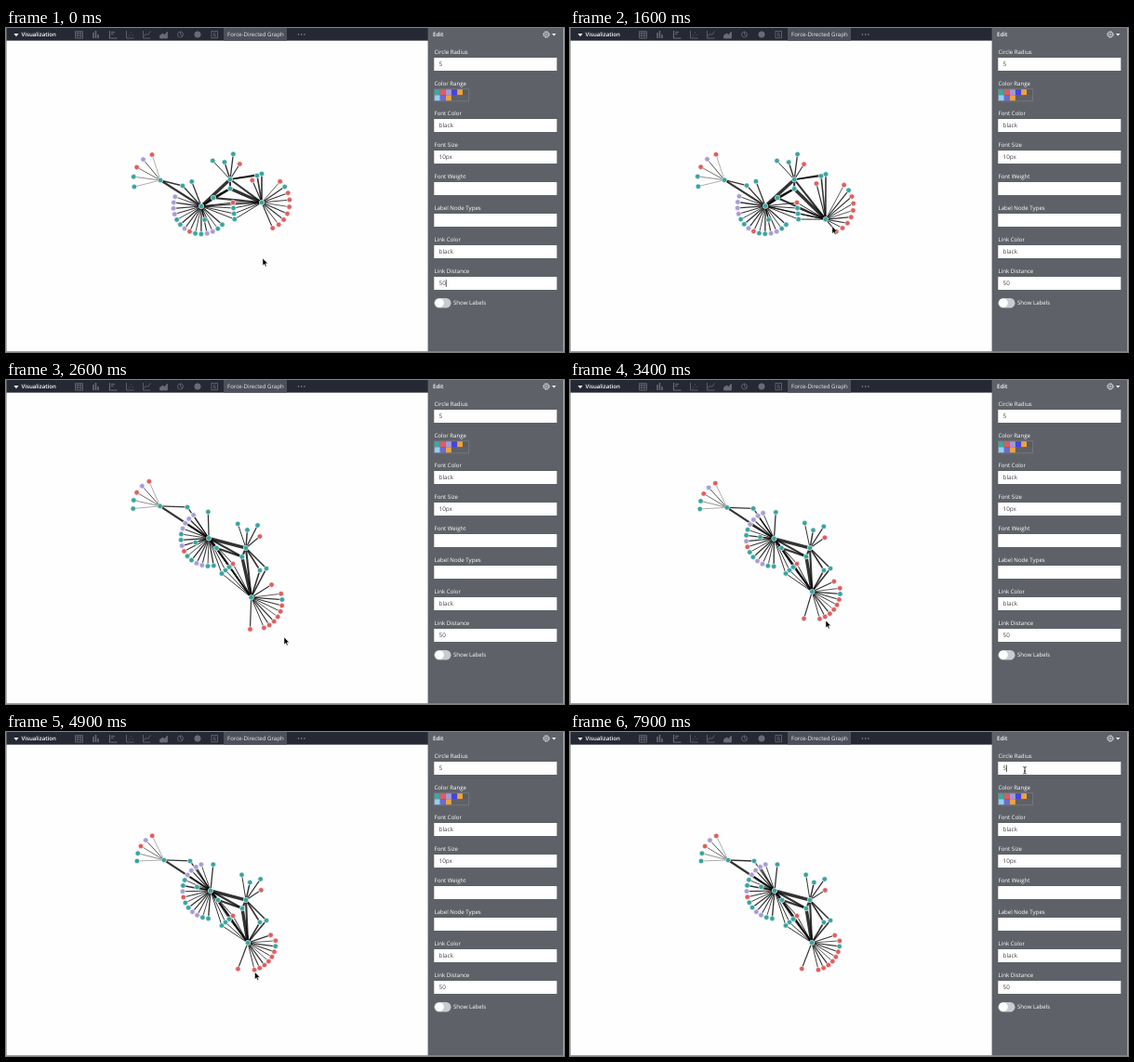
Recreate the animation shown at these times as an HTML page. Size 600x349 px, loop 8000 ms.

```html
<!DOCTYPE html>
<html lang="en">
<head>
<meta charset="utf-8">
<title>Force-Directed Graph</title>
<style>
html, body { margin: 0; width: 100%; height: 100%; overflow: hidden; background: #fff; }
svg { display: block; width: 600px; height: 349px; font: 6.1px "Open Sans", sans-serif; text-rendering: geometricPrecision; }
.bold { font-weight: 600; }
.icons { fill: none; stroke: #666c78; stroke-width: .8; }
</style>
</head>
<body>
<svg id="stage" viewBox="0 0 600 349">
  <rect width="600" height="349" fill="#fefefe"/>
  <g id="links" stroke="#000" stroke-opacity=".8"></g>
  <g id="nodes" stroke="#fff" stroke-width=".6"></g>

  <rect width="454" height="13.6" fill="#242934"/>
  <rect x="234" width="68" height="13.6" fill="#4b505a"/>
  <path d="M8.5 6h5l-2.5 3.2z" fill="#fff"/>
  <text class="bold" x="16.5" y="9.3" fill="#fff">Visualization</text>
  <text x="238" y="9.3" fill="#eceef0">Force-Directed Graph</text>
  <g class="icons">
    <path d="M74.5 3.5h8v7.5h-8zM74.5 5.5h8M74.5 8h8M77 3.5v7.5M80 3.5v7.5"/>
    <path d="M94 11V5M96.5 11V3M99 11V7" stroke-width="1.5"/>
    <path d="M111.5 3v8h8M113 4.5h4M113 6.5h2.5" stroke-width="1.2"/>
    <path d="M129.5 3v8h8M132 8h1M134 5h1M135.5 7.5h1"/>
    <path d="M147.5 3v8h8M148.5 9l2-3 2 1.5 3-4"/>
    <path d="M165.5 11V8l3-2 2 1.5 3-3.5v7z" fill="#666c78"/>
    <circle cx="187.5" cy="7" r="3"/><path d="M187.5 7V4M187.5 7l2.5 1.5"/>
    <circle cx="206" cy="7" r="3.2" fill="#666c78"/>
    <rect x="221" y="3.3" width="6.5" height="7.5"/>
    <path d="M225.5 5h-2v4h2v-2h-2" stroke-width=".6"/>
  </g>
  <path d="M314.5 7h9" stroke="#8d929b" stroke-width="1.6" stroke-linecap="round" stroke-dasharray="0 3.2"/>

  <rect x="453.6" width="146" height="349" fill="#5e6268"/>
  <path d="M.3 0V348.5H600" fill="none" stroke="#85888d" stroke-width=".8"/>
  <text class="bold" x="459" y="9.3" fill="#fff">Edit</text>
  <g fill="none" stroke="#e6e7e8">
    <circle cx="581" cy="7" r="3.2" stroke-dasharray="1.5 1"/>
    <circle cx="581" cy="7" r="2.7" stroke-width=".6"/>
    <circle cx="581" cy="7" r="1.1" stroke-width=".7"/>
  </g>
  <path d="M587 6h4.4l-2.2 2.6z" fill="#fff"/>
  <text x="460.5" y="62" fill="#fff">Color Range</text>
  <g id="swatches"></g>
  <rect x="460.5" y="65.8" width="37" height="13" fill="none" stroke="#a4a7ab" stroke-width=".6" stroke-dasharray="1 1"/>
  <g id="fields"></g>
  <rect x="460.5" y="291" width="18" height="10.5" rx="5.2" fill="#c9cbce"/>
  <circle cx="466" cy="296.2" r="4.8" fill="#fff"/>
  <text x="481" y="298.4" fill="#fff">Show Labels</text>

  <path id="caret" stroke="#222" stroke-width=".7"/>
  <g id="tooltip">
    <rect x="267" y="267.3" width="161" height="17.4" fill="#f1f1f1" stroke="#c9c9c9" stroke-width=".6"/>
    <g fill="#333" font-size="5.6">
      <text x="270.5" y="274.2">Harrowend Tillock Plaza - Quillabenford Ave at Ostmoran</text>
      <text x="270.5" y="281.8">Ave</text>
    </g>
  </g>
  <g id="cursor">
    <path id="arrow" d="M0 0V8L1.8 6.3 3 9 4.2 8.4 3.1 5.7H5.5Z" stroke="#fff" stroke-width=".5"/>
    <path id="beam" d="M-1.7-3.5Q0-3.5 0-2.3 0-3.5 1.7-3.5M0-2.3V2.8M-1.7 4Q0 4 0 2.8 0 4 1.7 4M-1 1H1" fill="none" stroke="#111" stroke-width=".8"/>
  </g>
</svg>
<script>
const $ = id => document.getElementById(id);
const set = (el, attrs) => { for (const key in attrs) el.setAttribute(key, attrs[key]); };
const add = (parent, tag, attrs, text = "") => {
  const el = document.createElementNS("http://www.w3.org/2000/svg", tag);
  set(el, attrs);
  el.textContent = text;
  parent.append(el);
  return el;
};
const smooth = x => { x = Math.min(1, Math.max(0, x)); return x * x * (3 - 2 * x); };
const mix = (a, b, k) => a + (b - a) * k;
const mixAll = (a, b, k) => a.map((v, i) => mix(v, b[i], k));

// Settings panel
const addField = (label, value, y) => {
  add($("fields"), "text", { x: 460.5, y: y - 3.8, fill: "#fff" }, label);
  add($("fields"), "rect", { x: 460.3, y, width: 132, height: 14, fill: "#fff" });
  add($("fields"), "text", { x: 465.5, y: y + 9.4, fill: "#444", "font-size": 6.4 }, value);
};
addField("Circle Radius", "5", 32);
[["Font Color", "black"], ["Font Size", "10px"], ["Font Weight", ""], ["Label Node Types", ""],
  ["Link Color", "black"], ["Link Distance", "50"]].forEach(([label, value], i) => addField(label, value, 98 + 34 * i));
["#3aa9a2", "#e25b5d", "#a697d8", "#4345dc", "#f0a13a", "#585c63", "#8fd0ef", "#6c6ad8", "#f0a13a"].forEach((fill, i) =>
  add($("swatches"), "rect", { x: 460.8 + i % 6 * 6.1, y: i < 6 ? 66.2 : 72.3, width: 5.9, height: 5.9, fill }));

// Graph: hubs move between two layouts, leaves fan out around them
const colors = { T: "#3ba39d", R: "#dc5f60", P: "#a89cd6" };
const nodes = [], links = [];
const addNode = (type, place) => {
  const node = { place, el: add($("nodes"), "circle", { r: 2.75, fill: colors[type] }) };
  nodes.push(node);
  return node;
};
const addLink = (a, b, width) => links.push({ a, b, el: add($("links"), "line", { "stroke-width": width }) });

// The big hub is dragged down, then springs back
const drag = t => {
  const hold = t < 2150 ? 1 : Math.exp((2150 - t) / 300);
  return [16 * smooth((t - 1600) / 550) * hold, 22 * smooth((t - 1300) / 420) * hold];
};

const center = [258, 181];
const hubs = {};
const addHub = (name, from, to) => {
  hubs[name] = addNode("T", (state, t) => {
    const pull = name === "S" ? drag(t) : [0, 0];
    return mixAll(from, to, state.turn).map((v, axis) =>
      v + (to[axis] - center[axis]) * state.stretch + pull[axis]);
  });
};
addHub("W", [166, 164], [170, 138]);
addHub("J", [190, 170], [198, 139]);
addHub("H", [210, 192], [220, 171]);
addHub("M", [223, 183], [228, 181]);
addHub("N", [241, 163], center);
addHub("P", [241, 173], [254, 190]);
addHub("S", [275, 188], [260, 227]);

const hubLinks = { 3.4: "HN PS", 2.1: "WH HM HP MP NP MS NS", 1.3: "WJ JH HS" };
for (const width in hubLinks)
  for (const [a, b] of hubLinks[width].split(" ")) addLink(hubs[a], hubs[b], width);

// from and to: first angle and step, in degrees; leaves trail behind their hub
const addFan = (name, types, { radius, ripple = 0, from, to, width = .9 }) => [...types].forEach((type, i) => {
  const length = radius + (i % 2 ? -ripple : ripple);
  const leaf = addNode(type, state => {
    const [x, y] = hubs[name].place(state, state.t - 200);
    const [start, step] = mixAll(from, to, state.fanTurn);
    const angle = (start + step * i) * Math.PI / 180;
    return [x + length * Math.cos(angle), y + length * Math.sin(angle)];
  });
  addLink(hubs[name], leaf, width + i * 3 % 4 * .15);
});
addFan("W", "RPRTT", { radius: 29, from: [-108, -21.5], to: [-116, -16.5], width: .4 });
addFan("H", "PPPPTTPRTTPPTT", { radius: 30, from: [-160, -12.2], to: [-109, -12] });
addFan("H", "T", { radius: 28.5, from: [-111, 0], to: [-84, 0], width: 1.3 });
addFan("H", "T", { radius: 15, from: [76, 0], to: [196, 0], width: 1.2 });
addFan("N", "TTTR", { radius: 23.5, ripple: 4, from: [-133, 25], to: [-99, 22], width: 1 });
addFan("S", "RTRRRRRR", { radius: 30, from: [-49, 14.5], to: [-4, 11.5], width: .8 });
addFan("S", "R", { radius: 26, from: [-113, 0], to: [-18, 0], width: 1.2 });
addFan("S", "R", { radius: 30, from: [67, 0], to: [111, 0], width: 1.2 });

// Rows of nodes shared by two hubs: first place, then spacing
const addRow = (types, ends, from, to, width) => [...types].forEach((type, i) => {
  const node = addNode(type, state => {
    const [x, y, dx, dy] = mixAll(from, to, state.turn);
    return [x + dx * i, y + dy * i];
  });
  for (const name of ends) addLink(hubs[name], node, width);
});
addRow("TT", "NS", [270, 159, 5, -2], [273, 205, 7, -2], 1.6);
addRow("RTTT", "HS", [244, 188, .6, 6], [244, 198, -4, 3.5], 1);

// Pointer moves: start time, end time, target
const moves = [[0, 400, 286, 306], [550, 700, 280, 271], [850, 1200, 275, 188], [1300, 2150, 299, 277],
  [2700, 3350, 275, 259], [3400, 4900, 267.5, 258.5], [5200, 5700, 260.5, 228], [7000, 7500, 518, 40], [7500, 7800, 489, 41]];
const pointer = t => moves.reduce((at, [start, end, x, y]) =>
  mixAll(at, [x, y], smooth((t - start) / (end - start))), [276, 248]);

function draw(t) {
  const turn = smooth((t - 1550) / 850);
  const swing = t < 2600 ? 1 : Math.exp((2600 - t) / 660);
  const state = { t, turn, fanTurn: turn * (1 - .28 * swing), stretch: .05 * turn * swing };
  for (const node of nodes) {
    [node.x, node.y] = node.place(state, t);
    set(node.el, { cx: node.x, cy: node.y });
  }
  for (const { a, b, el } of links) set(el, { x1: a.x, y1: a.y, x2: b.x, y2: b.y });

  const [x, y] = pointer(t);
  const overField = x > 461 && y > 32 && y < 46;
  set($("cursor"), { transform: `translate(${x} ${y})` });
  set($("arrow"), { visibility: overField ? "hidden" : "visible" });
  set($("beam"), { visibility: overField ? "visible" : "hidden" });

  const typing = t < 400 || t >= 900 && t < 1400;
  set($("caret"), { d: typing ? "M473.3 271v8" : t >= 7900 ? "M469.5 35.5v7.5" : "" });
  set($("tooltip"), { opacity: t < 5750 ? 0 : Math.min(1, Math.max(0, (6400 - t) / 150)) });
}

const began = performance.now();
const tick = () => {
  draw((performance.now() - began) % 8000);
  requestAnimationFrame(tick);
};
tick();
</script>
</body>
</html>
```
